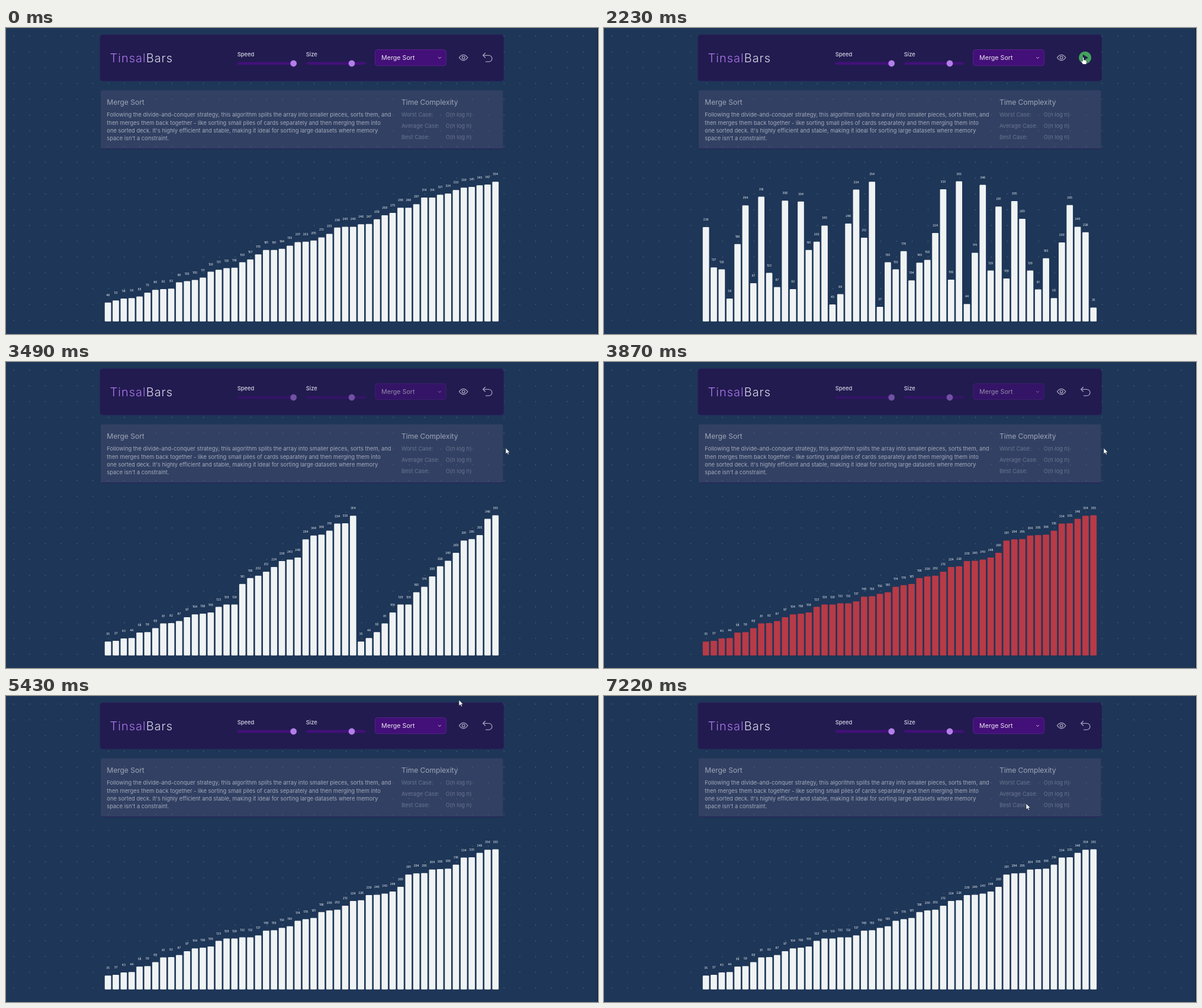
These frames come from a looping animation (1000x518 px, 7.24 s). An HTML page:

```html
<!DOCTYPE html>
<html lang="en">
<head>
<meta charset="utf-8">
<title>Merge sort visualizer</title>
<style>
  html, body { margin: 0; width: 100%; height: 100%; overflow: hidden; background: #1e3657; }
  svg { display: block; width: 100%; height: 100%; font-family: Inter, sans-serif; }
  .small { font-size: 9.35px; }
  .heading { font-size: 12.02px; fill: #9ea5b7; }
  .info { fill: #a3aaba; }
  .cost { fill: #69748e; }
  .label { font-weight: 500; fill: #d3d7e4; }
  .track { stroke: #43107a; stroke-width: 4.6; stroke-linecap: round; }
  .thumb { fill: #b27ee9; }
  .icon { fill: none; stroke: #a09fba; stroke-width: 1.35; stroke-linecap: round; stroke-linejoin: round; }
  #values { font-size: 4.7px; font-weight: 500; fill: #dde3ea; text-anchor: middle; }
</style>
</head>
<body>
<svg viewBox="0 0 1000 518" preserveAspectRatio="none">
  <defs>
    <pattern id="dots" x="12.3" y="13" width="26.72" height="26.72" patternUnits="userSpaceOnUse">
      <rect width="1.2" height="1.2" fill="#62788d"/>
    </pattern>
    <linearGradient id="violet">
      <stop stop-color="#b07bf0"/><stop offset="1" stop-color="#9a68d8"/>
    </linearGradient>
  </defs>
  <rect width="1000" height="518" fill="#1e3657"/>
  <rect width="1000" height="518" fill="url(#dots)"/>
  <rect x="999" width="1" height="518" fill="#101b33"/>

  <rect x="159" y="11.5" width="681.5" height="78" rx="4.5" fill="#221b50" stroke="#2a1b5c" stroke-width=".8"/>
  <text x="175.5" y="57.7" font-size="20" font-weight="300" letter-spacing="1" fill="#d9d7e8"><tspan fill="url(#violet)">Tinsal</tspan>Bars</text>
  <text class="small label" x="390.7" y="48.3">Speed</text>
  <text class="small label" x="506.8" y="48.3">Size</text>
  <g id="sliders">
    <path class="track" d="M393 60H489M509.500 60H605.500"/>
    <circle class="thumb" cx="485.700" cy="60" r="5.4"/>
    <circle class="thumb" cx="584" cy="60" r="5.4"/>
  </g>
  <g id="select">
    <rect x="623.700" y="36.700" width="119.600" height="27" rx="4" fill="#430f78" stroke="#592492" stroke-width=".9"/>
    <text x="634" y="54" font-size="10.69" fill="#ebe7f3">Merge Sort</text>
    <path d="M730.200 49.300l2.300 2.300 2.300-2.300" fill="none" stroke="#d9d1e8"/>
  </g>
  <g id="eye" class="icon">
    <path d="M765.500 50.200Q772.700 40.600 779.900 50.200Q772.700 59.800 765.500 50.200Z"/>
    <circle cx="772.700" cy="50.200" r="2.300"/>
  </g>
  <path id="undo" class="icon" d="M809.500 42.500L805.700 46.300L809.500 50.100M805.700 46.300H815.500a5.400 5.400 0 0 1 0 10.900H810.500"/>
  <g id="play">
    <circle cx="812.600" cy="50.200" r="10.500" fill="#43a45b"/>
    <path d="M809 44.700L818 50.200L809 55.700Z" fill="#221b50"/>
  </g>

  <rect x="160" y="105.500" width="679.500" height="99" rx="2" fill="rgba(80,82,118,.4)"/>
  <path d="M160.500 204.500H839.500" stroke="#28205a"/>
  <text class="heading" x="170.300" y="130">Merge Sort</text>
  <g id="description" class="small info"></g>
  <text class="heading" x="668" y="130">Time Complexity</text>
  <g id="costs" class="small cost"></g>

  <g id="bars"></g>
  <g id="values"></g>
  <g id="cursor" stroke-linejoin="round">
    <path id="arrow" d="M0 0V10.200L2.400 8.100L4 11.600L5.700 10.800L4.200 7.500H7.300Z" fill="#fff" stroke="#1a2033" stroke-width=".7"/>
    <path id="hand" d="M-1.200.8Q0-.8 1.200.8V4.700Q2.600 4 3.100 5Q4.400 4.500 4.900 5.600Q6 5.400 6 6.700V9.200Q5.500 11 4.700 12H-.6Q-1.900 9.800-3.800 7.300Q-4.200 5.700-2.500 6.100L-1.200 7.100Z" fill="#fff" stroke="#1a2033" stroke-width=".7"/>
  </g>
</svg>
<script>
const LOOP = 7240, SHUFFLE = 1900, START = 2370, SORTED = 3680, READY = 4700;
const WRITE_MS = 4.1, FIRST_WRITE = 2395;
const PITCH = 13.36, BAR_WIDTH = 10.7, LEFT = 166.8, FLOOR = 496.7, SCALE = 0.668;

const previous = [48, 53, 58, 59, 63, 73, 80, 82, 83, 99, 102, 105, 111, 126, 131, 135, 136,
  150, 157, 170, 181, 181, 184, 192, 201, 202, 205, 213, 222, 238, 240, 240, 246, 247, 259,
  269, 275, 288, 288, 297, 314, 314, 321, 324, 333, 339, 341, 345, 347, 354];
const shuffled = [239, 137, 132, 58, 196, 294, 97, 316, 123, 87, 306, 82, 304, 181, 202, 243,
  43, 69, 248, 334, 212, 354, 37, 150, 132, 178, 104, 149, 156, 224, 335, 106, 355, 44, 174,
  346, 129, 291, 109, 305, 260, 129, 81, 160, 59, 200, 295, 240, 226, 35];

// Cursor tip: time, x, y
const path = [[500, 900, 130], [870, 785, 56], [1150, 785, 56], [1630, 811, 52], [2230, 809.5, 49.5],
  [2370, 809.5, 49.5], [3090, 844, 145.5], [5130, 844, 145.5], [5430, 765, 6.5], [5999, 765, 6.5],
  [6000, 763, 1], [6890, 763, 1], [7220, 713, 182], [7240, 713, 182]];

const byId = id => document.getElementById(id);
const show = (id, visible) => byId(id).setAttribute('visibility', visible ? 'visible' : 'hidden');

function add(parent, tag, attributes, text = '') {
  const node = document.createElementNS('http://www.w3.org/2000/svg', tag);
  for (const key in attributes) node.setAttribute(key, attributes[key]);
  node.textContent = text;
  return byId(parent).appendChild(node);
}

['Following the divide-and-conquer strategy, this algorithm splits the array into smaller pieces, sorts them, and',
  'then merges them back together - like sorting small piles of cards separately and then merging them into',
  'one sorted deck. It\'s highly efficient and stable, making it ideal for sorting large datasets where memory',
  'space isn\'t a constraint.'
].forEach((line, i) => add('description', 'text', { x: 170.3, y: 150.2 + i * 13.36 }, line));

['Worst', 'Average', 'Best'].forEach((name, i) => {
  const y = 150.2 + i * 18.7;
  add('costs', 'text', { x: 668, y }, name + ' Case:');
  add('costs', 'text', { x: 742.7, y }, 'O(n log n)');
});

const columns = previous.map((_, i) => {
  const x = LEFT + i * PITCH;
  return {
    bar: add('bars', 'rect', { x, width: BAR_WIDTH, rx: 1.2 }),
    value: add('values', 'text', { x: x + BAR_WIDTH / 2 })
  };
});

// Bottom-up merge sort recorded as a list of [index, value] writes
function recordWrites(start) {
  const list = [...start], writes = [];
  for (let size = 2; size < list.length * 2; size *= 2) {
    for (let low = 0; low < list.length; low += size) {
      const merged = list.slice(low, low + size).sort((a, b) => a - b);
      merged.forEach((value, k) => {
        list[low + k] = value;
        writes.push([low + k, value]);
      });
    }
  }
  return writes;
}
const writes = recordWrites(shuffled);

function heightsAt(time) {
  if (time < SHUFFLE) return previous;
  const shown = time < 3190 ? START + 90 * Math.floor((time - START) / 90)
                            : 3190 + 100 * Math.floor((time - 3190) / 100);
  const done = time >= SORTED ? writes.length : Math.max(0, Math.floor((shown - FIRST_WRITE) / WRITE_MS));
  const list = [...shuffled];
  for (const [index, value] of writes.slice(0, done)) list[index] = value;
  return list;
}

function cursorAt(time) {
  const next = path.findIndex(point => point[0] > time);
  if (next < 1) return null;
  const [t0, x0, y0] = path[next - 1], [t1, x1, y1] = path[next];
  const p = (time - t0) / (t1 - t0), eased = p * p * (3 - 2 * p);
  return [x0 + (x1 - x0) * eased, y0 + (y1 - y0) * eased];
}

function drawCursor(time) {
  const tip = cursorAt(time);
  const over = centre => !!tip && Math.abs(tip[0] - centre) < 14 && Math.abs(tip[1] - 50) < 13;
  const onEye = over(772.7), onButton = over(812.6), pointing = onEye || onButton;
  show('arrow', tip && !pointing);
  show('hand', tip && pointing);
  if (tip) byId('cursor').setAttribute('transform', `translate(${tip})`);
  byId('eye').style.stroke = onEye && !onButton ? '#b27ee9' : '';
}

function draw(time) {
  const sorting = time >= START && time < READY;
  const playable = time >= SHUFFLE && time < START;
  for (const id of ['sliders', 'select']) byId(id).setAttribute('opacity', sorting ? 0.55 : 1);
  show('play', playable);
  show('undo', !playable);
  byId('bars').setAttribute('fill', time >= SORTED && time < READY ? '#b83a47' : '#eff3f4');
  heightsAt(time).forEach((number, i) => {
    const { bar, value } = columns[i], height = number * SCALE;
    bar.setAttribute('y', FLOOR - height);
    bar.setAttribute('height', height);
    value.setAttribute('y', FLOOR - height - 11);
    value.textContent = number;
  });
  drawCursor(time);
}

function tick() {
  draw(performance.now() % LOOP);
  requestAnimationFrame(tick);
}
tick();
</script>
</body>
</html>
```
